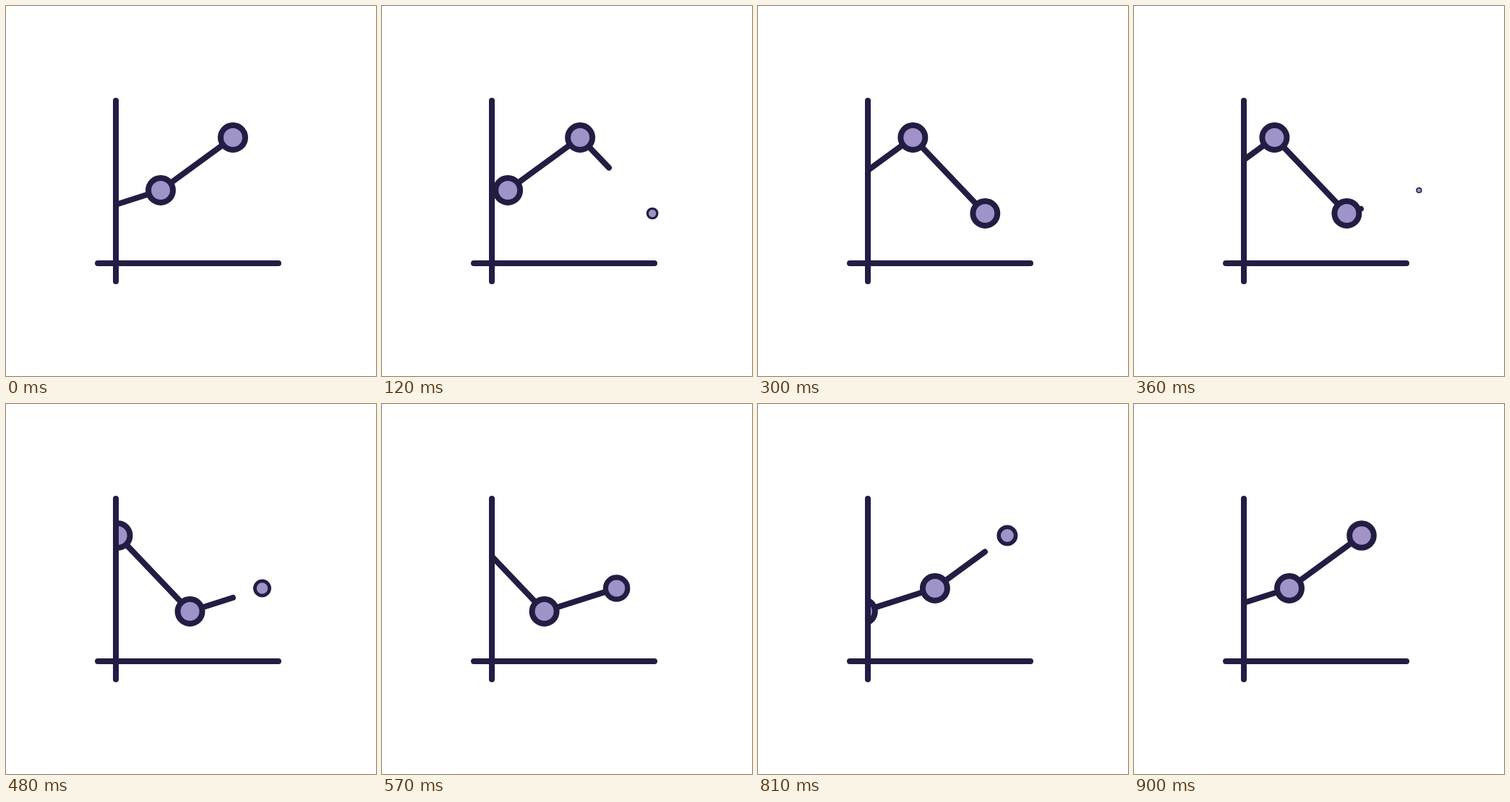
These frames come from a looping animation (512x512 px, 930 ms). An HTML page with a canvas:

```html
<!DOCTYPE html>
<html lang="en">
<head>
<meta charset="utf-8">
<title>Line chart</title>
<style>
  html, body { margin: 0; width: 100%; height: 100%; overflow: hidden; background: #fff; }
  canvas { display: block; width: 512px; height: 512px; }
</style>
</head>
<body>
<canvas id="stage" width="512" height="512"></canvas>
<script>
const ctx = document.getElementById('stage').getContext('2d');
const INK = '#231d43', LILAC = '#a093c8';
const LOOP = 930, STEP = 30, SPEED = 299 / 900;
const AXIS_X = 152, HEAD_X = 314, GAP = 100;
const LEVELS = [255, 182, 287];

const levelAt = i => LEVELS[(i + 3) % 3];

function stroke(points) {
  ctx.beginPath();
  points.forEach(([x, y]) => ctx.lineTo(x, y));
  ctx.stroke();
}

function dot(x, y, scale) {
  ctx.lineWidth = 8 * scale;
  ctx.beginPath();
  ctx.arc(x, y, 17 * scale, 0, Math.PI * 2);
  ctx.fill();
  ctx.stroke();
}

function draw(time) {
  const shift = time * SPEED;
  const dots = [];
  for (let i = -1; i < 6; i++) dots.push([214 + i * GAP - shift, levelAt(i)]);

  ctx.fillStyle = '#fff';
  ctx.fillRect(0, 0, 512, 512);
  ctx.strokeStyle = INK;
  ctx.fillStyle = LILAC;
  ctx.lineCap = ctx.lineJoin = 'round';

  ctx.save();
  ctx.beginPath();
  ctx.rect(AXIS_X, 0, 512 - AXIS_X, 512);
  ctx.clip();

  // The line is revealed up to a fixed head position.
  const next = dots.findIndex(([x]) => x > HEAD_X);
  const [ax, ay] = dots[next - 1], [bx, by] = dots[next];
  const headY = ay + (by - ay) * (HEAD_X - ax) / (bx - ax);
  ctx.lineWidth = 8;
  stroke([...dots.slice(0, next), [HEAD_X, headY]]);

  // Dots grow while they approach the head.
  for (const [x, y] of dots) {
    const scale = Math.min(1, (HEAD_X + GAP - x) / GAP);
    if (scale > 0.01) dot(x, y, scale);
  }
  ctx.restore();

  ctx.lineWidth = 8;
  stroke([[AXIS_X, 131], [AXIS_X, 381]]);
  stroke([[127, 356], [377, 356]]);
}

const start = performance.now();
function tick() {
  const time = (performance.now() - start + 0.5) % LOOP;
  draw(Math.floor(time / STEP) * STEP);
  requestAnimationFrame(tick);
}
tick();
</script>
</body>
</html>
```
